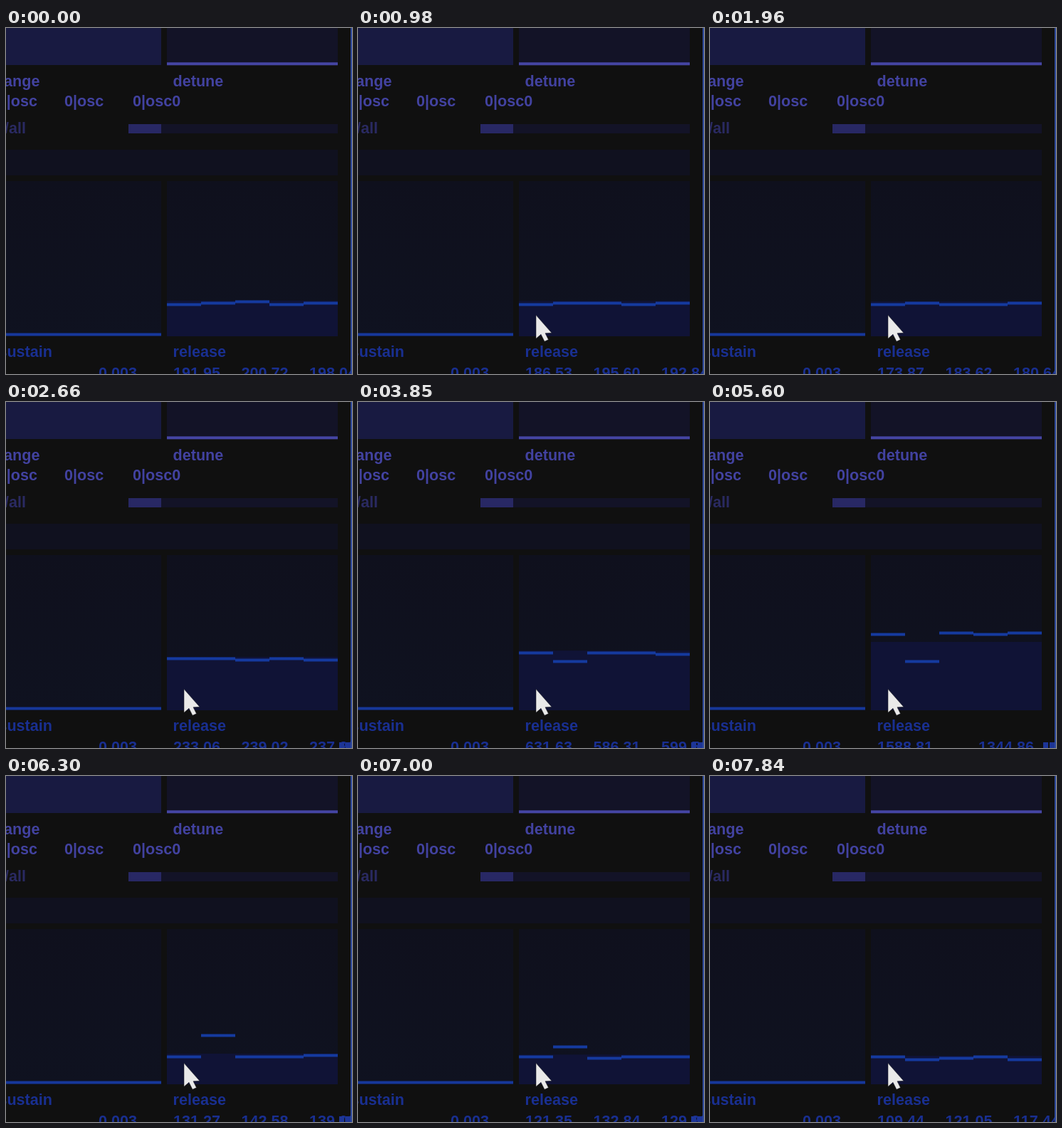
An HTML page for the animation above (8000 ms loop, 486 px wide and 486 px high).

```html
<!DOCTYPE html>
<html lang="en">
<head>
<meta charset="utf-8">
<title>Synth panel</title>
<style>
html, body { margin: 0; width: 100%; height: 100%; overflow: hidden; background: #101010; }
svg { display: block; width: 100%; height: 100%; }
text { font: bold 21.6px "Liberation Sans", Arial, sans-serif; }
.osc { fill: #4242a0; }
.env { fill: #192f91; }
.end { text-anchor: end; }
</style>
</head>
<body>
<svg viewBox="0 0 486 486">
  <defs>
    <linearGradient id="panel" x2="0" y2="1">
      <stop stop-color="#0f101d"/>
      <stop offset="1" stop-color="#0f1220"/>
    </linearGradient>
  </defs>
  <rect width="486" height="486" fill="#101010"/>
  <rect width="218" height="52" fill="#181a41"/>
  <rect x="226" width="240" height="52" fill="#131327"/>
  <rect x="226" y="48.3" width="240" height="4" fill="#4545a4"/>
  <g class="osc">
    <text class="end" x="47.500" y="82">range</text>
    <text x="234.500" y="82">detune</text>
    <text class="end" x="44" y="110">0|osc</text>
    <text x="82" y="110">0|osc</text>
    <text x="178" y="110">0|osc0</text>
  </g>
  <text x="-2" y="148" fill="#2a2a62">/all</text>
  <rect x="172" y="135" width="294" height="13" fill="#131327"/>
  <rect x="172" y="135" width="46" height="13" fill="#282864"/>
  <rect y="171" width="466" height="36" fill="#10111f"/>
  <rect y="215" width="218" height="218" fill="url(#panel)"/>
  <rect y="428.500" width="218" height="4" fill="#16379a"/>
  <rect x="226" y="215" width="240" height="218" fill="url(#panel)"/>
  <rect id="fill" x="226" width="240" fill="#101336"/>
  <g id="bars" fill="#153a9f"></g>
  <g class="env">
    <text class="end" x="65" y="462">sustain</text>
    <text x="234.500" y="462">release</text>
    <text x="130" y="492">0.003</text>
    <g id="labels"></g>
  </g>
  <path id="smear" d="M468 478h7v8h-7zM477 478h9v8h-9z" fill="#1d3597"/>
  <rect x="484" width="2" height="486" fill="#2f4a9c"/>
  <path id="cursor" d="M0 0V33L7 27L12 37L17.500 34.500L13 25.500L22 25Z" fill="#e9e9e9" stroke="#17171c" stroke-width=".5"/>
</svg>
<script>
const LOOP = 8000, STEP = 70, START = 560, END = 7840;

// [time, value] points; the second bar trails behind the others
const level = [[START, 386], [1960, 387], [2660, 361], [4690, 346], [5600, 325], [6300, 393], [END, 396]];
const trailing = [[START, 386], [1960, 387], [2660, 361], [6300, 366], [END, 396]];
const release = [[START, 191.95], [1960, 173.87], [2660, 233.06], [4690, 912.98], [5600, 1588.81], [6300, 131.27], [END, 109.44]];

const $ = id => document.getElementById(id);
const clamp = (v, lo, hi) => Math.min(hi, Math.max(lo, v));

function add(parent, tag, attrs) {
  const el = document.createElementNS("http://www.w3.org/2000/svg", tag);
  for (const name in attrs) el.setAttribute(name, attrs[name]);
  return $(parent).appendChild(el);
}

function at(track, t) {
  const i = Math.max(1, track.findIndex(p => p[0] >= t));
  const [t0, a] = track[i - 1], [t1, b] = track[i];
  return a + (b - a) * (t - t0) / (t1 - t0);
}

const bars = Array.from({ length: 5 }, (_, i) =>
  add("bars", "rect", { x: 226 + i * 48, width: 48, height: 4 }));
const labels = Array.from({ length: 3 }, (_, i) =>
  add("labels", "text", { x: 235 + i * 95.5, y: 492 }));

function draw(time) {
  const t = clamp(Math.floor(time / STEP) * STEP, START, END);
  const y = at(level, t), value = at(release, t);

  bars.forEach((bar, i) => {
    const wobble = 1.5 * Math.sin(i * 2.2 + t / 700);
    const base = i === 1 ? at(trailing, t) : y;
    bar.setAttribute("y", Math.round((base + wobble) / 2) * 2 - 1.5);
  });
  const top = Math.max(y, 340) - 3;
  $("fill").setAttribute("y", top);
  $("fill").setAttribute("height", 433 - top);

  // later readouts lean towards 300; wide ones push the next tab stop
  const wide = value >= 1000;
  [0, .1, .07].forEach((lean, i) => {
    labels[i].textContent = (value * (300 / value) ** lean).toFixed(2);
  });
  labels[1].setAttribute("x", wide ? 377 : 330.5);
  labels[2].style.display = wide ? "none" : "";
  $("smear").style.display = t >= 2660 && t < 7350 ? "" : "none";

  const u = clamp((time - START) / 420, 0, 1), ease = u * (2 - u);
  $("cursor").style.display = time < START ? "none" : "";
  $("cursor").setAttribute("transform", `translate(${190 + 60 * ease} ${374 + 29.3 * ease})`);
}

function tick() {
  draw(performance.now() % LOOP);
  requestAnimationFrame(tick);
}
tick();
</script>
</body>
</html>
```
